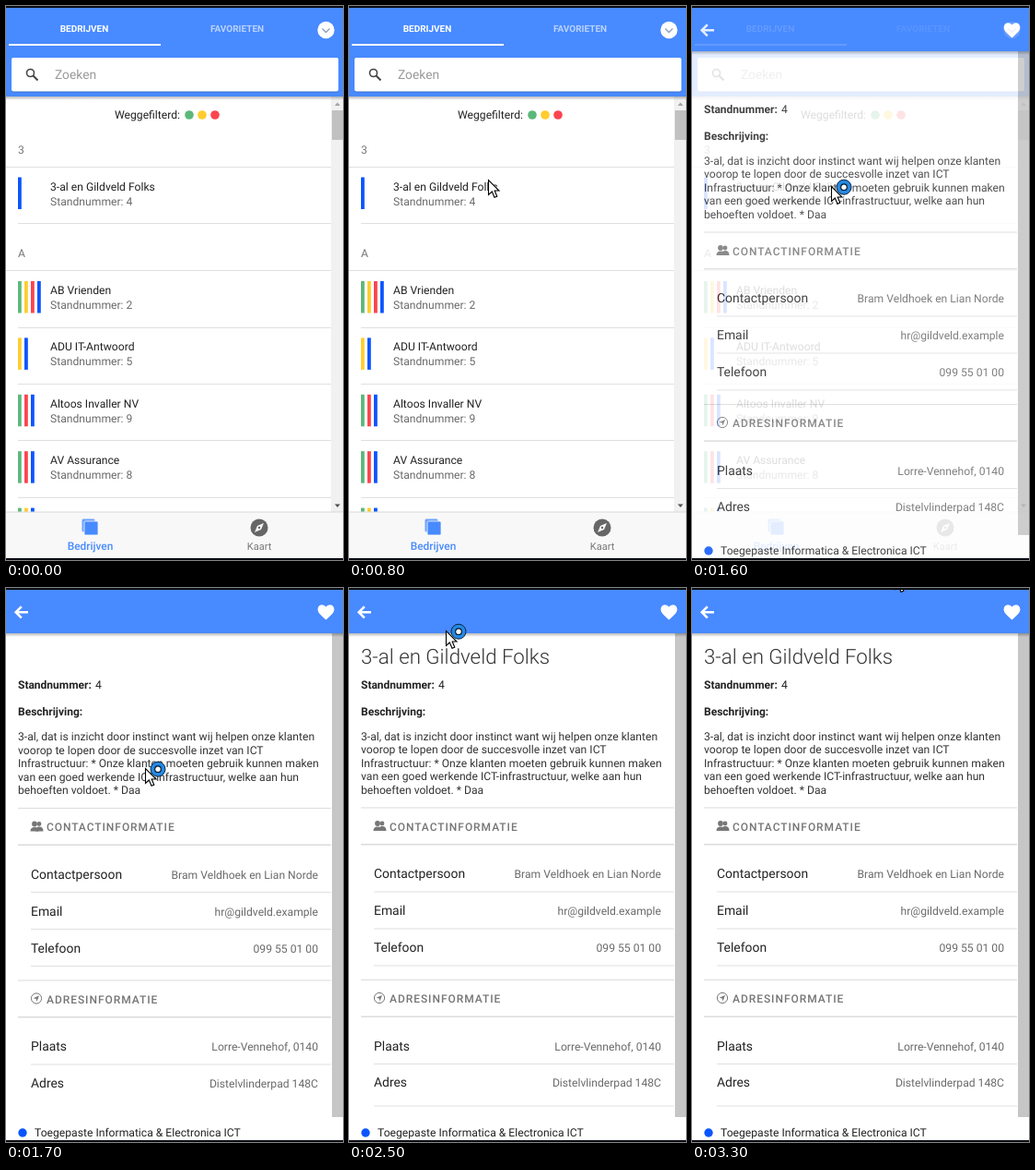
These frames come from a looping animation (366 px wide and 600 px high, 3700 ms). An HTML page:

```html
<!DOCTYPE html>
<html lang="nl">
<head>
<meta charset="utf-8">
<title>Bedrijvengids</title>
<style>
  html, body { margin: 0; width: 100%; height: 100%; overflow: hidden; background: #fff; }
  svg { display: block; width: 366px; height: 600px; }
  text { font-family: Roboto, Arial, sans-serif; white-space: pre; text-rendering: geometricPrecision; }
</style>
</head>
<body>
<svg id="stage" viewBox="0 0 366 600" xmlns="http://www.w3.org/2000/svg">
  <defs>
    <linearGradient id="shade" x1="0" y1="0" x2="0" y2="1">
      <stop offset="0" stop-color="#000" stop-opacity=".28"/>
      <stop offset="1" stop-color="#000" stop-opacity="0"/>
    </linearGradient>
    <clipPath id="listClip"><rect y="98" width="353" height="450"/></clipPath>
  </defs>
  <g id="list"></g>
  <g id="detail"></g>
  <g id="cursor">
    <path d="M.5 .5V16.5L4.3 13L7 19.3L9.8 18.2L7.2 12H12Z" fill="#fff" stroke="#000" stroke-width="1.1"/>
    <g id="ring">
      <circle cx="14" cy="1.2" r="8" fill="#2489e4" stroke="#0b2440"/>
      <circle id="hole" cx="14" cy="1.2" r="3.3" stroke="#0b1826" stroke-width="1.2"/>
    </g>
  </g>
  <rect width="366" height="2" fill="#0b0d14"/>
  <rect y="598" width="366" height="2" fill="#0b0d14"/>
</svg>
<script>
const BLUE = '#488aff', BAR = '#0a55ff', GREEN = '#5cb87a', YELLOW = '#ffcd2e', RED = '#fb4450';
const DARK = '#222', GREY = '#6a6a6a', LINE = '#e0e0e0';
const SIZE = 12.15;
const el = id => document.getElementById(id);

const text = (x, y, s, { size = SIZE, fill = DARK, weight = 400, anchor = 'start', gap = 0 } = {}) =>
  `<text x="${x}" y="${y}" font-size="${size}" fill="${fill}" font-weight="${weight}" text-anchor="${anchor}" letter-spacing="${gap}">${s}</text>`;
const rect = (x, y, w, h, fill, extra = '') =>
  `<rect x="${x}" y="${y}" width="${w}" height="${h}" fill="${fill}" ${extra}/>`;
const dot = (x, y, r, fill) => `<circle cx="${x}" cy="${y}" r="${r}" fill="${fill}"/>`;
const rule = (x, y, end = 353, color = LINE) => rect(x, y, end - x, 1, color);
const stroke = (d, color, width) =>
  `<path d="${d}" fill="none" stroke="${color}" stroke-width="${width}"/>`;
const shape = (d, fill) => `<path d="${d}" fill="${fill}"/>`;

function company(y, name, stand, colors) {
  const bars = colors.map((c, i) => rect(13 + i * 7, y, 3.8, 34.5, c)).join('');
  const label = name && text(48, y + 14, name) +
    text(48, y + 30, 'Standnummer: ' + stand, { fill: GREY });
  return bars + label;
}

function listPage() {
  const rows = [
    ['AB Vrienden', 2, [GREEN, YELLOW, RED, BAR]],
    ['ADU IT-Antwoord', 5, [YELLOW, BAR]],
    ['Altoos Invaller NV', 9, [GREEN, RED, BAR]],
    ['AV Assurance', 8, [GREEN, RED, BAR]],
    ['', 0, [GREEN, YELLOW, BAR]]
  ];
  const items = rows.map((r, i) => {
    const y = 298 + i * 61.4;
    return company(y, ...r) + rule(13, Math.round(y + 49.5));
  }).join('');
  const header = rect(0, 0, 366, 98, BLUE) + rect(0, 98, 366, 4, 'url(#shade)') +
    text(85, 28, 'BEDRIJVEN', { size: 10, fill: '#fff', weight: 700, anchor: 'middle' }) +
    text(251, 28, 'FAVORIETEN', { size: 10, fill: '#b9d2ff', weight: 700, anchor: 'middle' }) +
    rect(3, 41, 165, 2, '#fff') + dot(347.5, 26, 9.2, '#fff') +
    stroke('M343.5 24.5L347.5 28.5L351.5 24.5', '#8a9cc0', 1.3) +
    rect(6, 57.5, 355, 36, '#000', 'rx="2" opacity=".2"') + rect(6, 56, 355, 36.5, '#fff', 'rx="2"') +
    '<circle cx="26.5" cy="72.5" r="4" fill="none" stroke="#444" stroke-width="1.6"/>' +
    stroke('M29.5 75.5L34.5 80.5', '#444', 1.9) +
    text(53, 79, 'Zoeken', { size: 13.8, fill: '#999' });
  const body = text(118, 122, 'Weggefilterd:') +
    [GREEN, YELLOW, RED].map((c, i) => dot(199 + i * 14, 118, 4.8, c)).join('') +
    text(13, 160, '3', { fill: '#757575' }) + rule(0, 174) +
    company(185.5, '3-al en Gildveld Folks', 4, [BAR]) + rule(13, 235) +
    text(13, 272, 'A', { fill: '#757575' }) + rule(0, 286) + items;
  const scroll = rect(353, 98, 13, 450, '#f1f1f1') + rect(354, 113, 12, 32, '#c1c1c1') +
    shape('M357 108L360 104.5L363 108Z', '#a3a3a3') + shape('M357 539.5L360 543L363 539.5Z', '#505050');
  const footer = rect(0, 548, 366, 50, '#f8f8f8') + rect(0, 547.5, 366, 1, '#d9d9d9') +
    rect(82.5, 555.5, 14, 14, '#6da2ff', 'rx="1.5"') +
    rect(85, 558, 15, 15, BLUE, 'rx="1.5" stroke="#f8f8f8" stroke-width=".8"') +
    text(91.5, 588.5, 'Bedrijven', { size: 11.9, fill: BLUE, weight: 500, anchor: 'middle' }) +
    dot(275, 565, 9.5, '#666') + shape('M280 560L277 567L270 570L273 563Z', '#f8f8f8') +
    dot(275, 565, 1.2, '#666') +
    text(275, 588.5, 'Kaart', { size: 11, fill: '#777', anchor: 'middle' });
  return rect(0, 0, 366, 600, '#fff') + `<g clip-path="url(#listClip)">${body}</g>` + scroll + header + footer;
}

function field(y, label, value) {
  return text(27, y, label, { size: 13.9 }) +
    text(339, y, value, { fill: GREY, anchor: 'end' });
}

function section(y, label) {
  return rule(13, y - 25, 353, '#dcdcdc') + rect(13, y + 14.5, 340, 1.5, '#dcdcdc') +
    text(44, y, label, { size: 12, fill: '#757575', weight: 500, gap: 0.95 });
}

function detailPage() {
  const story = [
    '3-al, dat is inzicht door instinct want wij helpen onze klanten',
    'voorop te lopen door de succesvolle inzet van ICT',
    'Infrastructuur: * Onze klanten moeten gebruik kunnen maken',
    'van een goed werkende ICT-infrastructuur, welke aan hun',
    'behoeften voldoet. * Daa'
  ].map((s, i) => text(13, 164.5 + i * 14.5, s, { fill: '#333' })).join('');
  const people = dot(36, 255, 2.4, '#777') + shape('M32 263Q32 258 36 258Q40.5 258 40.5 263Z', '#777') +
    dot(31, 255, 2.9, '#777') + shape('M26.5 263Q26.5 258.5 31 258.5Q35.5 258.5 35.5 263Z', '#777');
  const compass = '<circle cx="33" cy="444" r="5.6" fill="none" stroke="#777"/>' +
    shape('M36 441L33.5 447.5L32.7 444.5L29.7 443.7Z', '#777');
  const head = rect(0, 0, 366, 49, BLUE) + rect(0, 49, 366, 4, 'url(#shade)') +
    stroke('M24 26.3H11M16.8 20.2L10.7 26.3L16.8 32.4', '#fff', 2.6) +
    shape('M347.5 34.4C341.2 29 338.6 26.6 338.6 23C338.6 17.7 344.6 16.7 347.5 20.4C350.4 16.7 356.4 17.7 356.4 23C356.4 26.6 353.8 29 347.5 34.4Z', '#fff');
  return rect(0, 0, 366, 600, '#fff') +
    '<g id="late">' +
    text(13, 82, '3-al en Gildveld Folks', { size: 22.3, fill: '#333', weight: 300 }) +
    rule(27, 560.5) + '</g><g id="body">' +
    text(13, 108.5, 'Standnummer:', { size: 12, weight: 700 }) + text(97, 108.5, '4') +
    text(13, 137.5, 'Beschrijving:', { size: 12, weight: 700 }) + story +
    section(262.5, 'CONTACTINFORMATIE') + people +
    field(314, 'Contactpersoon', 'Bram Veldhoek en Lian Norde') + rule(27, 328.5) +
    field(354, 'Email', 'hr@gildveld.example') + rule(27, 368.5) +
    field(394, 'Telefoon', '099 55 01 00') + rule(27, 408.5) +
    section(449, 'ADRESINFORMATIE') + compass +
    field(500.5, 'Plaats', 'Lorre-Vennehof, 0140') + rule(27, 515) +
    field(540, 'Adres', 'Distelvlinderpad 148C') + '</g>' +
    dot(18, 590, 4.7, BAR) +
    text(31, 594, 'Toegepaste Informatica &amp; Electronica ICT') +
    rect(354, 49, 12, 524, '#c6c6c6') + head;
}

el('list').innerHTML = listPage();
el('detail').innerHTML = detailPage();

const LOOP = 3700, STEP = 100;
// Pointer stops: [ms, x, y]
const path = [
  [100, 356, 572], [200, 323, 502], [300, 284, 402], [400, 240, 306], [500, 196, 233],
  [600, 165, 200], [700, 153, 190], [800, 151, 188], [1000, 151, 193], [1200, 151, 195],
  [1800, 151, 195], [1900, 170, 180], [2000, 204, 150], [2100, 227, 122], [2200, 222, 98],
  [2300, 188, 76], [2400, 145, 58], [2500, 105, 46], [2600, 120, 42], [2700, 142, 38],
  [2800, 166, 34], [2900, 200, 24], [3000, 229, 8], [3100, 224, -9.5], [3200, 222, -13],
  [3300, 220, -15]
];

function pointerAt(t) {
  const n = path.findIndex(p => p[0] > t);
  if (n < 0) return path[path.length - 1].slice(1);
  const [t0, x0, y0] = path[n - 1], [t1, x1, y1] = path[n];
  const k = (t - t0) / (t1 - t0);
  return [x0 + (x1 - x0) * k, y0 + (y1 - y0) * k];
}

function draw(now) {
  const t = Math.floor((now % LOOP) / STEP) * STEP;
  el('cursor').style.display = t < 100 ? 'none' : '';
  if (t >= 100) {
    const [x, y] = pointerAt(t);
    el('cursor').setAttribute('transform', `translate(${x} ${y})`);
    el('hole').setAttribute('fill', y < 46 ? BLUE : '#fff');
  }
  el('ring').style.display = t < 1400 ? 'none' : '';
  el('detail').style.display = t < 1600 ? 'none' : '';
  el('detail').setAttribute('opacity', t < 1700 ? 0.85 : 1);
  el('late').style.display = t < 1800 ? 'none' : '';
  const drop = t < 1700 ? 7 : t < 1800 ? 0.5 : 0;
  el('body').setAttribute('transform', `translate(0 ${drop})`);
}

const start = performance.now();
function tick() {
  draw(performance.now() - start);
  requestAnimationFrame(tick);
}
tick();
</script>
</body>
</html>
```
